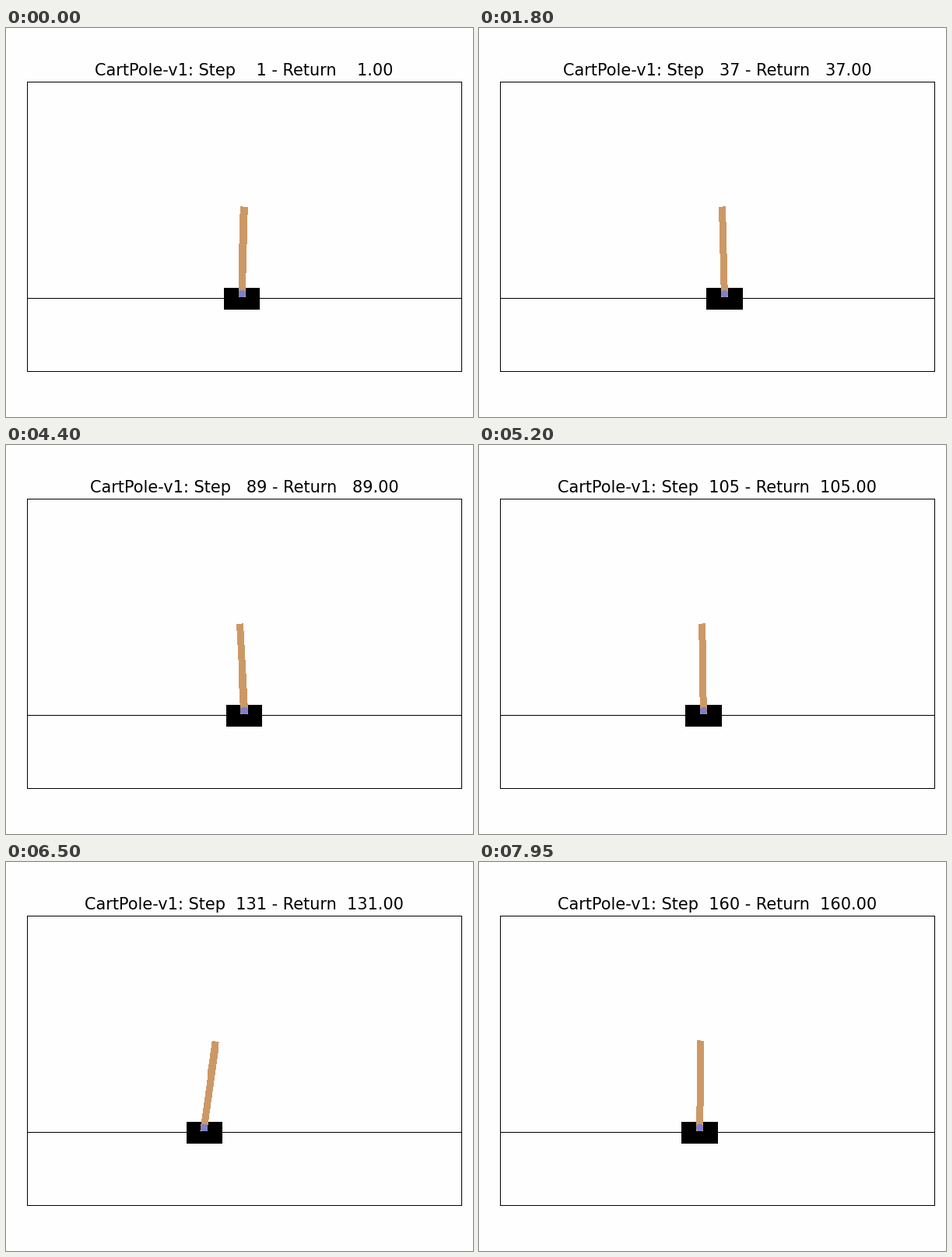
Recreate the animation shown at these times as a matplotlib script. Size 600 by 500 pixels, loop 8 s.

```python
import numpy as np
import matplotlib.pyplot as plt
from matplotlib.animation import FuncAnimation

W, H = 600, 500
STEPS = 160
INTERVAL = 50

# Viewport: a 600x400 scene shown at 0.93 scale inside a frame
SCALE, LEFT, TOP = 0.93, 27.0, 69.3
X0, X1, Y0, Y1 = 27, 585, 69, 441
TRACK_ROW = 347

PAPER = 254
BLACK = (0, 0, 0)
POLE = (204, 153, 102)
AXLE = (127, 127, 204)

# Key poses: step, cart centre (stage pixels), pole tilt (radians, nan = free)
POSES = [(1, 303.0, 0.025), (37, 315.1, -0.023), (65, 318.1, -0.047),
         (89, 306.0, -0.050), (105, 288.1, -0.0125), (120, 261.5, np.nan),
         (131, 254.8, 0.131), (160, 283.9, 0.009)]


def solve_motion():
    """Smoothest cart-pole swing through the key poses.

    The point z = x + (2/3) * tilt obeys z'' = g * tilt, so z alone
    fixes both the cart position and the tilt.
    """
    metre = 125 * SCALE
    arm = metre * 2 / 3
    gravity = 9.8 * 0.02 ** 2 * metre
    eye = np.eye(STEPS + 2)
    tilt = np.diff(eye, 2, axis=0) / gravity
    cart = eye[1:-1] - arm * tilt
    bend = arm * np.diff(tilt, 2, axis=0)

    rows, goals = list(bend), [0] * len(bend)
    for step, x, angle in POSES:
        rows.append(5 * cart[step - 1])
        goals.append(5 * x)
        if np.isfinite(angle):
            rows.append(5 * metre * tilt[step - 1])
            goals.append(5 * metre * angle)
    z = np.linalg.lstsq(np.array(rows), np.array(goals), rcond=None)[0]
    return cart @ z, tilt @ z


cart_x, tilts = solve_motion()

# Scene coordinates sampled by each stage pixel inside the frame
cols, rows = np.arange(X0 + 1, X1), np.arange(Y0 + 1, Y1)
gx, gy = np.meshgrid(np.floor((cols + 0.5 - LEFT) / SCALE) + 0.5,
                     399.5 - np.floor((rows + 0.5 - TOP) / SCALE))

base = np.full((H, W, 3), PAPER, np.uint8)
base[Y0:Y1 + 1, X0:X1 + 1] = BLACK
base[Y0 + 1:Y1, X0 + 1:X1] = PAPER


def draw_scene(i):
    img = base.copy()
    view = img[Y0 + 1:Y1, X0 + 1:X1]
    dx, dy = gx - (cart_x[i] - LEFT) / SCALE, gy - 107.5
    s, c = np.sin(tilts[i]), np.cos(tilts[i])
    along, across = dx * s + dy * c, dx * c - dy * s
    view[(abs(dx) < 25) & (abs(gy - 100) < 15)] = BLACK
    view[(abs(across) < 5) & (along > -5) & (along < 120)] = POLE
    view[dx ** 2 + dy ** 2 < 25] = AXLE
    img[TRACK_ROW, X0:X1] = BLACK
    return img


def label(step):
    return f"CartPole-v1: Step {step:4d} - Return {step:7.2f}"


plt.rcParams["font.family"] = "DejaVu Sans"
fig = plt.figure(figsize=(W / 100, H / 100), dpi=100, facecolor=str(PAPER / 255))
ax = fig.add_axes([0, 0, 1, 1])
ax.axis("off")
picture = ax.imshow(draw_scene(0), aspect="auto", interpolation="nearest")
title = fig.text(306.1 / W, 438.8 / H, label(1), size=15, ha="center", va="baseline")


def update(i):
    picture.set_data(draw_scene(i))
    title.set_text(label(i + 1))
    return picture, title


anim = FuncAnimation(fig, update, frames=STEPS, interval=INTERVAL,
                     repeat=True, repeat_delay=0, blit=False)
plt.show()
```
